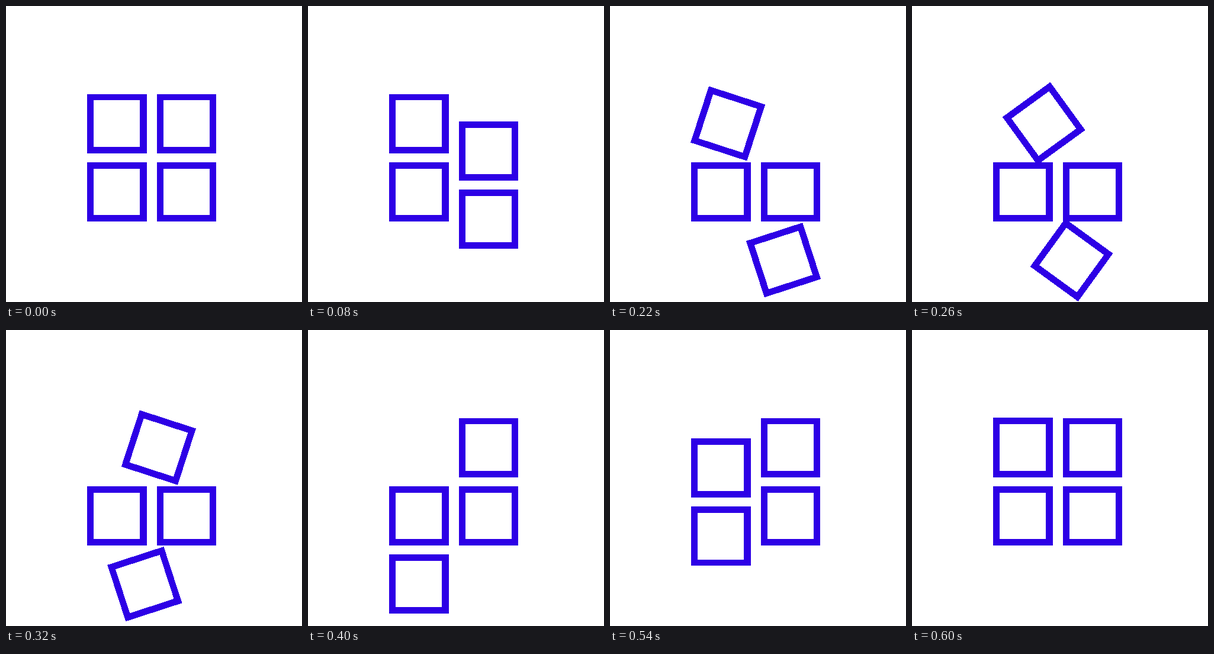
Recreate the animation shown at these times as an HTML page. Size 500 by 500 pixels, loop 0.62 s.

```html
<!DOCTYPE html>
<html lang="en">
<head>
<meta charset="utf-8">
<title>Four squares</title>
<style>
  html, body { margin: 0; width: 100%; height: 100%; overflow: hidden; background: #fff; }
  svg { display: block; width: 500px; height: 500px; }
  path { fill: #2d00e6; fill-rule: evenodd; shape-rendering: crispEdges; }
</style>
</head>
<body>
<svg viewBox="0 0 500 500"></svg>
<script>
const LOOP = 620, STEP = 20, PHASE = 200;
const WIDTH = 100.25, HEIGHT = 100.1, EDGE_X = 11.1, EDGE_Y = 10.9;
const LEFT = 137.3, RIGHT = 254.7, TOP = 148.55, BOTTOM = 263.75;
const DROP = 115.3, SLIDE = 117.45;

const svg = document.querySelector('svg');
const box = (w, h) => `M${-w / 2} ${-h / 2}h${w}v${h}h${-w}z`;
const outline = box(WIDTH, HEIGHT) + box(WIDTH - 2 * EDGE_X, HEIGHT - 2 * EDGE_Y);

const [topLeft, topRight, bottomLeft, bottomRight] = Array.from({ length: 4 }, () => {
  const path = document.createElementNS('http://www.w3.org/2000/svg', 'path');
  path.setAttribute('d', outline);
  return svg.appendChild(path);
});

function place(path, x, y, angle = 0) {
  const turn = angle % 180 ? ` rotate(${angle})` : '';
  path.setAttribute('transform', `translate(${x + WIDTH / 2} ${y + HEIGHT / 2})${turn}`);
}

const progress = (time, start) => Math.min(1, Math.max(0, (time - start) / PHASE));

function draw(now) {
  const time = Math.floor((now % LOOP) / STEP) * STEP;
  const down = DROP * progress(time, 0);
  const roll = progress(time, PHASE);
  const up = DROP * progress(time, 2 * PHASE);

  place(topLeft, LEFT + SLIDE * roll, TOP, 180 * roll);
  place(topRight, RIGHT, TOP + down);
  place(bottomLeft, LEFT, BOTTOM - up);
  place(bottomRight, RIGHT - SLIDE * roll, BOTTOM + down - up, -180 * roll);
}

const start = performance.now();
function tick() {
  draw(performance.now() - start);
  requestAnimationFrame(tick);
}
tick();
</script>
</body>
</html>
```
